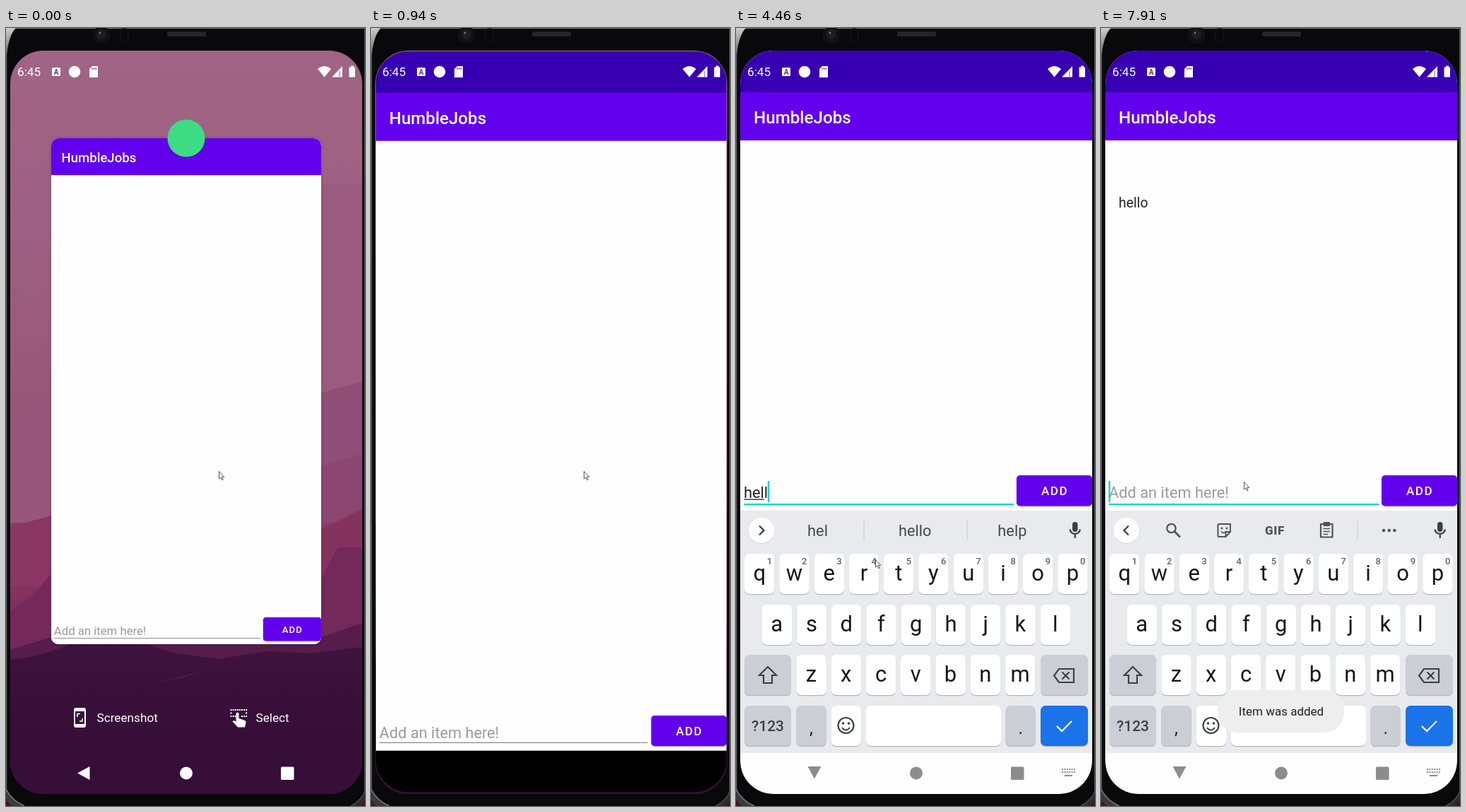
Recreate the animation shown at these times as an HTML page with a canvas. Size 508x1101 px, loop 8000 ms.

```html
<!DOCTYPE html>
<html lang="en">
<head>
<meta charset="utf-8">
<title>To-do app</title>
<style>
html, body { margin: 0; width: 100%; height: 100%; overflow: hidden; background: #09090b; }
canvas { display: block; width: 508px; height: 1101px; }
</style>
</head>
<body>
<canvas id="stage" width="508" height="1101"></canvas>
<script>
const c = document.getElementById('stage').getContext('2d');
const LOOP = 8000;
const PURPLE = '#6200ee', TEAL = '#10d5c8', INK = '#3c4043';
const FULL_BASE = 1025, KEYBOARD_TOP = 683;

// Pointer tip: time, x, y
const POINTER = [
  [0, 301, 627], [1200, 289, 645], [1350, 209, 910], [1500, 150, 1000], [1620, 115, 1033],
  [1920, 150, 1003], [2210, 200, 845], [2360, 197, 752], [5730, 270, 630], [5860, 336, 502],
  [6000, 390, 532], [6130, 437, 569], [6280, 441, 602], [6410, 441, 628], [6550, 443, 634],
  [6680, 444, 640], [6800, 445, 645], [7220, 420, 647], [7350, 350, 648], [7480, 265, 647],
  [7600, 216, 645], [7910, 202, 642]
];
// Window opening progress: 0 = card, 1 = full screen
const OPENING = [[0, 0], [820, 0.85], [940, 0.985], [1060, 0.997], [1200, 1]];
const CARET = [[0, 0], [1920, 1], [2510, 0], [3050, 1], [3450, 0], [3980, 1], [5330, 0],
  [5730, 1], [6280, 0], [6950, 1], [7480, 0], [7910, 1]];
// Typed letters, underlined letters
const TYPED = [[0, 0, 0], [3980, 1, 0], [4100, 1, 1], [4220, 2, 1], [4340, 3, 2], [4460, 4, 3],
  [4580, 5, 4], [4830, 5, 5], [6950, 0, 0]];
const WORDS = [[0, ''], [4100, 'h he hey'], [4220, 'he hey her'], [4340, 'he hey help'],
  [4460, 'hel hello help'], [4580, 'hell hello help'], [4830, "hello hellos Hello's"], [7100, '']];
const BACK_TURN = [[0, 0], [2360, 20], [2510, 49], [2650, 90]];
const NAV_TINT = [[0, '#fff'], [2070, '#c4c4c4'], [2210, '#8c8c8c']];
const RIPPLE = [[0, 0], [6950, 30], [7100, 90], [7220, 0]];
const TOAST = [[0, 0], [7220, 0.35], [7350, 0.75], [7480, 1]];

const at = (list, t) => list.filter(e => e[0] <= t).pop();

function rect(x, y, w, h, fill) { c.fillStyle = fill; c.fillRect(x, y, w, h); }
function roundPath(x, y, w, h, r) { c.beginPath(); c.roundRect(x, y, w, h, r); }
function round(x, y, w, h, r, fill) { roundPath(x, y, w, h, r); c.fillStyle = fill; c.fill(); }
function disc(x, y, r, fill) { c.beginPath(); c.arc(x, y, r, 0, 7); c.fillStyle = fill; c.fill(); }
function shape(d, fill) { c.fillStyle = fill; c.fill(new Path2D(d)); }
function line(d, color, width = 2) { c.strokeStyle = color; c.lineWidth = width; c.stroke(new Path2D(d)); }
function text(s, x, y, size, color, { weight = 400, align = 'left', gap = 0 } = {}) {
  c.font = `${weight} ${size}px Roboto, sans-serif`;
  c.textAlign = align;
  c.letterSpacing = gap + 'px';
  c.fillStyle = color;
  c.fillText(s, x, y);
}
function inside(draw) { c.save(); draw(); c.restore(); }
function moved(x, y, draw) { inside(() => { c.translate(x, y); draw(); }); }
function blend(x0, y0, x1, y1, stops) {
  const g = c.createLinearGradient(x0, y0, x1, y1);
  stops.forEach(([p, color]) => g.addColorStop(p, color));
  return g;
}

function body() {
  rect(0, 0, 508, 1101, '#09090b');
  rect(0, 0, 1.3, 1101, '#5e6060');
  rect(507, 0, 1, 1101, '#555757');
  rect(0, 0, 508, 1, '#777');
  shape('M0 0H14Q4 10 1 38H0Z', blend(0, 0, 8, 38, [[0, '#d0d0cc'], [1, '#666']]));
  shape('M0 1078Q8 1093 26 1101H0Z', '#3a3b3c');
  shape('M508 1080Q503 1093 488 1101H508Z', '#2c2d2e');
  shape('M0 1091Q3 1098 9 1101H0Z', '#4a0f22');
  shape('M508 1091Q506 1098 499 1101H508Z', '#4a0f22');
  line('M0 1077Q8 1093 26 1101', '#77797a', 1.5);
  line('M508 1080Q503 1093 488 1101', '#55575a', 1.2);
  disc(135, 10, 12.5, '#111114');
  disc(135, 9, 7, '#1d1d23');
  disc(133, 7, 1.4, '#777b82');
  c.strokeStyle = '#151518';
  c.lineWidth = 1.5;
  roundPath(162, 1, 11, 19, 4);
  c.stroke();
  round(228, 5, 55, 7, 2, '#252526');
}

function wallpaper() {
  rect(6, 32, 498, 1052, blend(0, 32, 0, 900, [[0, '#a06485'], [0.3, '#9d6082'], [0.55, '#985878'],
    [0.72, '#924a6e'], [0.8, '#8a3763'], [0.9, '#84305c'], [1, '#6b2555']]));
  shape('M440 220H504V520L440 530Z', '#9a5b7f');
  shape('M6 552Q50 535 64 478V700H6Z', '#98577a');
  shape('M440 518L504 500V690L440 700Z', '#904e76');
  shape('M440 622L504 602V700H440Z', '#8b4671');
  shape('M6 706L64 690V790H6Z', '#8a3763');
  shape('M440 712L504 680V740L440 790Z', '#86325f');
  shape('M440 790L470 735H504V880H440Z', '#73295a');
  shape('M6 825Q34 810 64 772V890H6Z', '#74295a');
  shape('M6 880L64 862H446L504 842V920H6Z', '#551c4c');
  shape('M6 894Q50 890 90 872H200L235 884 300 893 370 882 430 885 504 876V1084H6Z',
    blend(0, 870, 0, 1000, [[0, '#3f133f'], [1, '#360e38']]));
  shape('M207 927L278 910 250 920Z', '#4b1848');
}

function statusIcons() {
  text('6:45', 16, 68, 17.2, '#fff');
  round(65, 56, 12, 12, 1.5, '#fff');
  text('A', 71, 66, 10, '#55308a', { weight: 700, align: 'center' });
  disc(97, 62, 8.3, '#fff');
  shape('M122 54H130V70H118V58Z', '#fff');
  for (let i = 0; i < 3; i++) rect(121.5 + i * 2.6, 56, 1.2, 3, '#67428c');
  shape('M441 58Q450.5 50 460 58L450.5 69.5Z', '#fff');
  shape('M476 54V69.5H461Z', '#fff');
  rect(471.5, 61, 1, 8, '#77539a');
  shape('M488 53.5H492V55.5H494V69.5H485.5V55.5H488Z', '#fff');
}

function navBar(t, hasKeyboard) {
  const tint = at(NAV_TINT, t)[1];
  inside(() => {
    c.translate(112 - (hasKeyboard ? 1 : 0), hasKeyboard ? 1051.5 : 1054.5);
    c.rotate(-at(BACK_TURN, t)[1] * Math.PI / 180);
    shape('M-11 0L6.5-9.5V9.5Z', tint);
  });
  disc(255, 1054.5, 9, tint);
  round(389, 1045.5, 18.5, 18.5, 1.5, tint);
  if (t < 2210) return;
  for (let i = 0; i < 12; i++) rect(461 + (i % 6) * 3.4, 1048 + (i / 6 | 0) * 4, 2, 2, tint);
  rect(465, 1057, 11, 2, tint);
}

function field(t, base) {
  const focused = t >= 1920;
  const [, typed, lined] = at(TYPED, t);
  const entry = 'hello'.slice(0, typed);
  text(entry || 'Add an item here!', 11, base - 18, 21.8, entry ? '#222' : '#9b9b9b');
  const wide = n => n ? c.measureText('hello'.slice(0, n)).width : 0;
  if (lined) rect(11, base - 16.5, wide(lined), 1.3, '#222');
  if (focused) rect(11, base - 10, 382, 2.4, TEAL);
  else rect(11, base - 12, 381, 1.2, '#858585');
  if (at(CARET, t)[1]) rect(10.7 + wide(typed), base - 42, 2.4, 30.5, TEAL);

  inside(() => {
    c.shadowColor = 'rgba(0,0,0,.25)';
    c.shadowBlur = 2;
    c.shadowOffsetY = 1;
    round(397, base - 50, 107, 43.5, 5, PURPLE);
  });
  const ripple = at(RIPPLE, t)[1];
  if (ripple) inside(() => {
    roundPath(397, base - 50, 107, 43.5, 5);
    c.clip();
    rect(397, base - 50, 107, 44, 'rgba(255,255,255,.12)');
    disc(446, base - 37, ripple, 'rgba(255,255,255,.2)');
  });
  text('ADD', 432, base - 22, 17, '#fff', { weight: 500, gap: 1.5 });
}

function app(t, base) {
  rect(6, 32, 498, 59, '#3700b3');
  rect(6, 91, 498, base - 91, '#fefefe');
  rect(6, 159, 498, 3, blend(0, 159, 0, 162, [[0, '#e6e6e6'], [1, '#fefefe']]));
  rect(6, 91, 498, 68, PURPLE);
  text('HumbleJobs', 25, 135, 24.2, '#fff', { weight: 500 });
  if (t >= 7100) text('hello', 25, 254, 19.4, '#222');
  field(t, base);
}

function recents() {
  wallpaper();
  inside(() => {
    inside(() => {
      c.shadowColor = 'rgba(0,0,0,.2)';
      c.shadowBlur = 5;
      round(64, 156, 382, 716, 10, '#fff');
    });
    roundPath(64, 156, 382, 716, 10);
    c.clip();
    placeWindow(0);
    app(0, FULL_BASE);
  });
  disc(255, 157, 26.5, 'rgba(0,0,0,.15)');
  disc(255, 156, 26.5, '#3ddc84');

  c.strokeStyle = '#fff';
  c.lineWidth = 2;
  roundPath(97, 963, 15, 26, 2);
  c.stroke();
  rect(97, 963, 15, 4, '#fff');
  rect(97, 985, 15, 4, '#fff');
  line('M101 975V970.5H105M104 981H108V977', '#fff', 1.6);
  text('Screenshot', 128.5, 982, 17.2, '#fff');

  for (let i = 0; i < 8; i++) {
    rect(317.5 + i * 3.1, 964, 2, 2, '#fff');
    if (i < 3 || i > 4) rect(317.5 + i * 3.1, 973, 2, 2, '#fff');
  }
  rect(317.5, 968.5, 2, 2, '#fff');
  rect(339.2, 968.5, 2, 2, '#fff');
  shape('M325.5 970Q327.5 967 329.5 970V977L338 980Q340 981 339.5 983L338 989.5H328L320.5 981.5 322 980 325.5 981.5Z', '#fff');
  text('Select', 353.5, 982, 17.2, '#fff');
}

function placeWindow(k) {
  const s = 0.767 + 0.233 * k;
  c.translate(64 - 58 * k, 156 - 65 * k);
  c.scale(s, s);
  c.translate(-6, -91);
}

function key(x, y, w, fill) {
  round(x, y + 1.3, w, 57, 7, '#b4b7bc');
  round(x, y, w, 57, 7, fill);
}

function letters(row, x, y, numbered) {
  [...row].forEach((ch, i) => {
    const left = x + i * 49.25;
    key(left, y, 42.5, '#fff');
    text(ch, left + 21.2, y + 38, 31, '#161616', { align: 'center' });
    if (numbered) text((i + 1) % 10, left + 35.5, y + 15, 13, '#606368', { weight: 500, align: 'center' });
  });
}

function microphone() {
  round(476, 699, 7.5, 14, 3.7, INK);
  line('M472.5 709.5A7.3 7.3 0 0 0 487 709.5M479.75 717V722', INK, 2.2);
}

function toolIcons() {
  const grey = '#505357';
  c.strokeStyle = grey;
  c.lineWidth = 2.3;
  c.beginPath();
  c.arc(99.5, 708, 6.2, 0, 7);
  c.stroke();
  line('M104 712.5L112 720.5', grey, 2.8);
  line('M167 702H183V713L176.5 720H167Q165.5 720 165.5 718.5V703.5Q165.5 702 167 702ZM183 713H176.5V720', grey, 2);
  disc(171, 708, 1.4, grey);
  disc(178, 708, 1.4, grey);
  line('M170 712.5Q173 716 176 713', grey, 1.6);
  text('GIF', 246, 716.5, 17, grey, { weight: 900, align: 'center', gap: 0.6 });
  line('M311 702H327.5V720.5H311Z', grey, 2.2);
  round(314.5, 699, 9.5, 6, 1, grey);
  line('M314.5 708.5H324M314.5 712.5H324M314.5 716.5H321', grey, 1.6);
  rect(362.5, 698, 1.2, 26, '#c9ccd1');
  for (let i = 0; i < 3; i++) disc(400 + i * 7.7, 711, 2.3, grey);
}

function keyboard(t) {
  rect(6, KEYBOARD_TOP, 498, 343, '#e8eaed');
  const words = at(WORDS, t)[1];
  const shift = t < 2510 ? 28 : 0;
  inside(() => {
    c.beginPath();
    c.rect(6, KEYBOARD_TOP, 498, 343);
    c.clip();
    c.translate(0, shift);
    disc(36, 712, 18, '#d6d8db');
    disc(36, 711, 18, '#fff');
    if (words) {
      line('M33 704.5L39.5 711 33 717.5', INK, 2.2);
      words.split(' ').forEach((w, i) => text(w, 115.5 + i * 137.7, 719, 21.8, '#45484c', { align: 'center' }));
      rect(180.5, 697, 1.2, 28, '#c9ccd1');
      rect(326.5, 697, 1.2, 28, '#c9ccd1');
    } else {
      line('M39 704.5L32.5 711 39 717.5', INK, 2.2);
      toolIcons();
    }
    microphone();

    letters('qwertyuiop', 12, 744, true);
    letters('asdfghjkl', 36.5, 816);
    letters('zxcvbnm', 85.3, 887);
    const grey = '#cbced5';
    key(12, 887, 66, grey);
    line('M45 904L57 916H51V927H39V916H33Z', INK, 2.2);
    key(431, 887, 67, grey);
    line('M457 907H478V926H457L450 916.5Z', INK, 2.2);
    line('M461.5 911.5L471.5 921.5M471.5 911.5L461.5 921.5', INK, 2.2);

    key(12, 959, 66, grey);
    text('?123', 45, 995, 21, INK, { weight: 500, align: 'center' });
    key(85.3, 959, 42.5, grey);
    text(',', 106.5, 999, 25, '#222', { align: 'center' });
    key(134.5, 959, 42.5, '#fff');
    c.strokeStyle = INK;
    c.lineWidth = 2.2;
    c.beginPath();
    c.arc(155.5, 987, 11, 0, 7);
    c.stroke();
    disc(151.5, 984, 1.8, INK);
    disc(159.5, 984, 1.8, INK);
    line('M150 990Q155.5 997 161 990', INK, 2);
    key(184, 959, 191, '#fff');
    key(381.5, 959, 42.5, grey);
    text('.', 402.7, 999, 25, '#222', { align: 'center' });
    key(431, 959, 67, '#1a73e8');
    line('M454 988L461 995 475 981', '#fff', 2.3);
  });
}

function toast(alpha) {
  if (!alpha) return;
  inside(() => {
    c.globalAlpha = alpha;
    round(165, 937, 179, 60, 28, '#eeeeef');
    text('Item was added', 255, 973, 17, '#202020', { align: 'center' });
  });
}

function pointer(t) {
  const [, x, y] = at(POINTER, t);
  moved(x + 0.5, y + 0.5, () => {
    const d = 'M0 0V10.5L2.3 8.5 4.2 12.3 5.7 11.6 4 7.8H7.3Z';
    shape(d, '#fff');
    line(d, '#444', 0.9);
  });
}

function screen(t) {
  if (t < 670) {
    recents();
    statusIcons();
    navBar(t, false);
    return;
  }
  if (t < 820) return rect(6, 32, 498, 1052, '#000');

  const hasKeyboard = t >= 2360;
  if (t < 1200) wallpaper();
  inside(() => {
    placeWindow(at(OPENING, t)[1]);
    roundPath(6, 32, 498, 1052, 46);
    c.clip();
    rect(6, 32, 498, 1052, hasKeyboard ? '#fefefe' : '#000');
    app(t, hasKeyboard ? KEYBOARD_TOP : FULL_BASE);
  });
  if (hasKeyboard) keyboard(t);
  statusIcons();
  if (t >= 1060) navBar(t, hasKeyboard);
  toast(at(TOAST, t)[1]);
}

function draw(t) {
  body();
  inside(() => {
    roundPath(6, 32, 498, 1052, 47);
    c.clip();
    screen(t);
  });
  pointer(t);
}

const start = performance.now();
function tick() {
  draw((performance.now() - start) % LOOP);
  requestAnimationFrame(tick);
}
tick();
</script>
</body>
</html>
```
